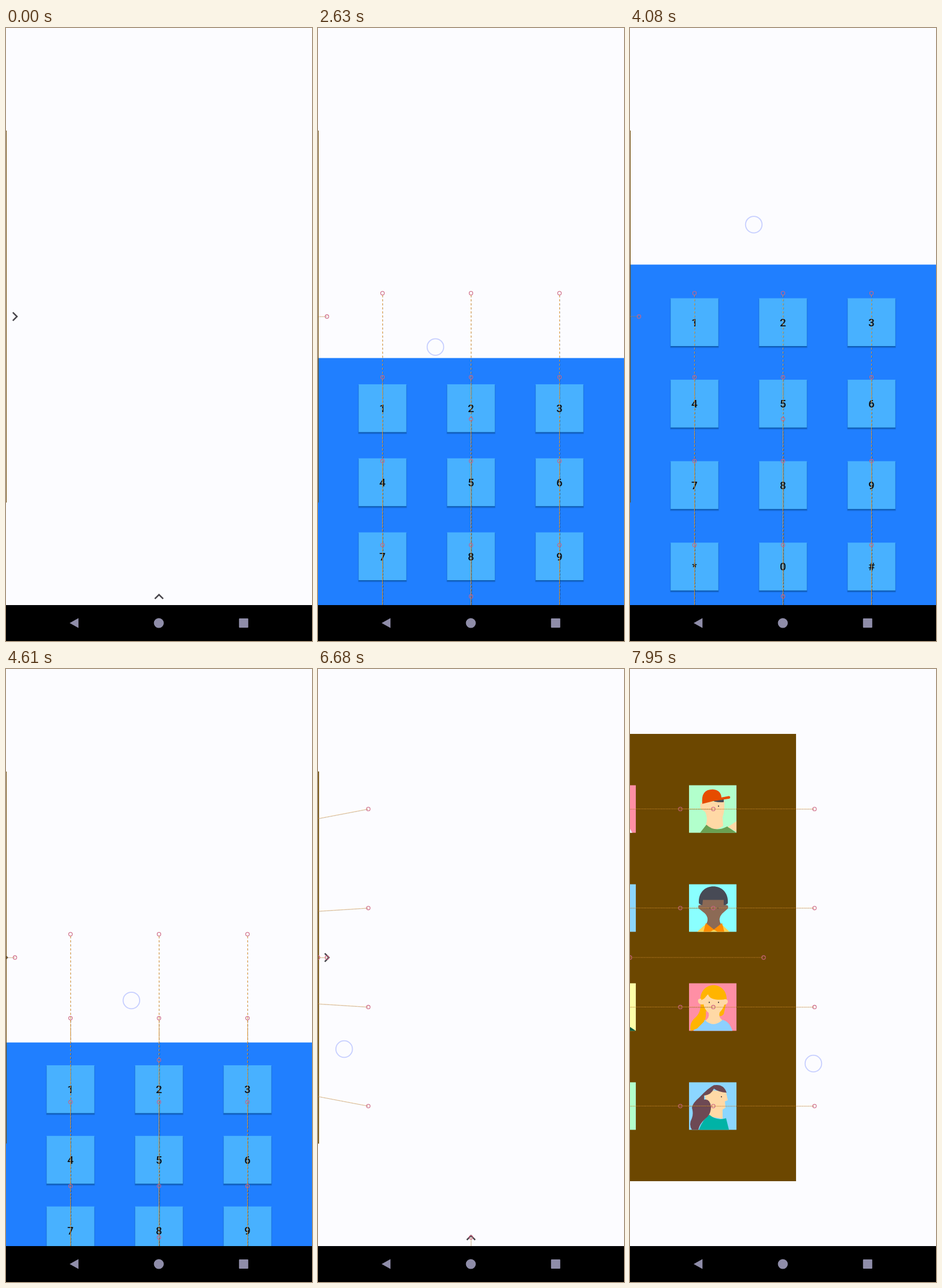
Write an HTML page that moves like this. It is 529 px wide and 1058 px high and loops after 7.99 s.

```html
<!DOCTYPE html>
<html lang="en">
<head>
<meta charset="utf-8">
<title>Sliding panels</title>
<style>
html, body { margin: 0; width: 100%; height: 100%; overflow: hidden; background: #fcfcff; }
svg { display: block; width: 100%; height: 100%; }
text { font: 500 19px Roboto, Arial, sans-serif; text-anchor: middle; fill: #101418; }
.chevron { fill: none; stroke: #47454b; stroke-width: 2.5; }
.trail { fill: none; stroke-dasharray: 1 1; }
.shade { stroke: #000; stroke-opacity: .4; transform: translate(.4px, .4px); }
.glow { stroke: #f0a238; stroke-opacity: .9; }
.knot { fill: none; stroke: #cc6480; stroke-width: 1.1; }
</style>
</head>
<body>
<svg viewBox="0 0 529 1058">
  <rect width="529" height="1058" fill="#fcfcff"/>
  <path id="chevRight" class="chevron" d="M11.8 490.8 19 498 11.8 505.2"/>
  <path id="chevUp" class="chevron" d="M257.3 985.2 264.5 978 271.7 985.2"/>
  <g id="keypad"><rect id="sheet" x="0" width="529" fill="#207fff"/></g>
  <g id="drawer"><rect id="board" x="-10" fill="#6c4700"/></g>
  <g id="keyTrails"></g>
  <g id="openTrails"></g>
  <g id="wideTrails"></g>
  <rect y="996" width="529" height="62"/>
  <g fill="#8f8da9">
    <path d="M110 1027 125.3 1018.5V1035.5Z"/>
    <circle cx="264.2" cy="1027" r="8.6"/>
    <rect x="402.8" y="1019" width="16" height="16" rx="1"/>
  </g>
  <circle id="touch" r="14.3" fill="none" stroke="#7f92ff" stroke-opacity=".42" stroke-width="1.8"/>
</svg>
<script>
const LOOP = 7990, TILE = 82.5, FLOOR = 996, MID = 498, DROP = 31;
const COLS = [111.5, 264.5, 417.5], ROWS = [0, 1, 2, 3];
const $ = id => document.getElementById(id);
const clamp = (v, lo, hi) => Math.min(hi, Math.max(lo, v));
const mix = (a, b, k) => a + (b - a) * k;

function add(parent, tag, attrs) {
  const el = document.createElementNS('http://www.w3.org/2000/svg', tag);
  set(el, attrs);
  parent.append(el);
  return el;
}
function set(el, attrs) {
  for (const k in attrs) el.setAttribute(k, attrs[k]);
}
const move = (el, x, y) => el.setAttribute('transform', `translate(${x} ${y})`);
const show = (el, on) => el.setAttribute('visibility', on ? 'visible' : 'hidden');

// Finger positions: [time, x, y]
const keyDrag = [
  [1520, 203, 967], [1690, 203, 894], [2630, 203, 551], [3120, 206, 357],
  [3490, 212, 273], [3860, 212, 272], [4080, 214, 339], [4650, 217, 590],
  [5240, 221, 869], [5450, 219, 980], [5780, 218, 1008]
];
const sideDrag = [
  [6680, 45, 656], [7170, 156, 667], [7460, 247, 674],
  [7710, 316, 681], [7910, 316, 681], [7950, 317, 681]
];

// Monotone cubic interpolation of one column of a drag
function follow(pts, t, c) {
  const last = pts.length - 1;
  if (t <= pts[0][0]) return pts[0][c];
  if (t >= pts[last][0]) return pts[last][c];
  const slope = i => (pts[i + 1][c] - pts[i][c]) / (pts[i + 1][0] - pts[i][0]);
  const tangent = i => {
    if (i === 0) return slope(0);
    if (i === last) return slope(last - 1);
    const a = slope(i - 1), b = slope(i);
    return a * b <= 0 ? 0 : 2 * a * b / (a + b);
  };
  let i = 0;
  while (t > pts[i + 1][0]) i++;
  const h = pts[i + 1][0] - pts[i][0], u = (t - pts[i][0]) / h;
  const u2 = u * u, u3 = u2 * u;
  return pts[i][c] * (2 * u3 - 3 * u2 + 1) + pts[i + 1][c] * (3 * u2 - 2 * u3)
    + h * (tangent(i) * (u3 - 2 * u2 + u) + tangent(i + 1) * (u3 - u2));
}

// Layout of the two panels for an open fraction
const sheetTop = p => mix(FLOOR, 354, p);
const keyGap = p => mix(11.5, 62.4, p);
const keyY = (row, p) => sheetTop(p) + keyGap(p) + TILE / 2 + row * (TILE + keyGap(p));
const sheetMid = p => sheetTop(p) + (4 * TILE + 5 * keyGap(p)) / 2;
const boardH = p => mix(642, 772, p);
const faceY = (row, p) => MID + (row - 1.5) * (TILE + (boardH(p) - 4 * TILE) / 5);

// Dashed path with a ring at each end
function trail(parent, x1, y1, x2, y2) {
  for (const c of ['shade', 'glow'])
    add(parent, 'path', { class: 'trail ' + c, d: `M${x1} ${y1}L${x2} ${y2}`, pathLength: 170 });
  for (const [cx, cy] of [[x1, y1], [x2, y2]])
    add(parent, 'circle', { class: 'knot', cx, cy, r: 3.1 });
}
const upTrail = g => trail(g, 264.5, 981, 264.5, 981 + DROP);
const rightTrail = g => trail(g, 15.5, MID, 15.5 - DROP, MID);

for (const x of COLS)
  for (const r of ROWS) trail($('keyTrails'), x, keyY(r, 0), x, keyY(r, 1));
trail($('keyTrails'), 264.5, sheetMid(0), 264.5, sheetMid(1));
upTrail($('keyTrails'));
rightTrail($('keyTrails'));

for (const r of ROWS) {
  trail($('openTrails'), -117.5, faceY(r, 0), 87, faceY(r, 1));
  trail($('wideTrails'), 87, faceY(r, 1), 319, faceY(r, 1));
  trail($('wideTrails'), -88, faceY(r, 1), 144, faceY(r, 1));
}
trail($('openTrails'), -231, MID, 0, MID);
upTrail($('openTrails'));
rightTrail($('openTrails'));
trail($('wideTrails'), 0, MID, 231, MID);

// Keys, drawn around their centres
const keys = [...'123456789*0#'].map(label => {
  const g = add($('keypad'), 'g', {}), half = TILE / 2;
  add(g, 'rect', { x: -half - 1, y: -half + 1, width: TILE + 2, height: TILE + 2.5, rx: 1, fill: '#003c82', 'fill-opacity': .22 });
  add(g, 'rect', { x: -half, y: -half + 1, width: TILE, height: TILE + 1, fill: '#00467e', 'fill-opacity': .45 });
  add(g, 'rect', { x: -half, y: -half, width: TILE, height: TILE, fill: '#48b1ff' });
  add(g, 'text', { y: 6.8 }).textContent = label;
  return g;
});

// Portraits in an 82 pixel square: background, then [colour, path]
const SKIN = '#ffd9a6', DARK = '#474a55', EYE = '#463c40';
const dot = (x, y) => `M${x - 1.1} ${y}a1.1 1.1 0 1 0 2.2 0a1.1 1.1 0 1 0-2.2 0`;
const mainFaces = [
  ['#b2ffcc',
    [SKIN, 'M23 29Q17 33 21 41L28 46Q33 57 29 69Q44 82 59 70L58 55Q62 44 61 27Z'],
    ['#6aa052', 'M19 82 30 68Q45 82 66 71L82 82Z'],
    [SKIN, 'M67 72 82 62V80Z'],
    [DARK, 'M41 26 60 24V29Q53 30 44 28Z'],
    ['#e64c00', 'M23 32Q20 7 41 7Q55 8 56 21L69 18.5Q73 20 70 23L43 27Z'],
    [EYE, dot(51, 36)]],
  ['#8affff',
    [DARK, 'M17 33C14-6 70-6 67 33L60 38H24Z'],
    ['#ffd24d', 'M14 82 30 68H55L70 82Z'],
    ['#8c6a55', 'M24 27H60V36Q70 34 67 42L57 51Q49 60 56 70L43 79 29 70Q36 59 27 50L17 42Q13 34 23 36Z'],
    ['#ff8c00', 'M25 82 29 67 43 78 57 67 61 82H49L43 78 37 82Z'],
    [EYE, dot(36, 41) + dot(50, 41)]],
  ['#ff8fa5',
    ['#ffb400', 'M20 32C16-6 68-6 65 31L60 53Q52 62 48 50L29 48Q31 66 18 78L3 82Q0 68 11 59Q21 51 20 32Z'],
    [SKIN, 'M22 27Q14 25 16 33Q19 38 25 36Q27 46 34 51Q36 60 27 65Q43 78 58 64Q50 58 53 50Q59 44 61 37Q68 36 67 30Q65 26 60 28Q36 30 33 19Z'],
    ['#8cd0ff', 'M8 82Q14 65 27 63Q42 78 58 63Q70 66 75 82Z'],
    ['#ffb400', 'M21 29Q28 27 33 17Q38 30 63 27L58 13 40 6 24 14Z M22 45Q29 58 26 66L14 78 3 82Q1 68 12 59Z'],
    [EYE, dot(35, 33) + dot(51, 33)]],
  ['#8cd6ff',
    [SKIN, 'M27 20 42 14 64 17 67 31 62 33 63 44 58 47 58 63 34 59 29 33Z'],
    ['#00b3a6', 'M17 82Q24 64 35 56Q48 67 64 62L69 82Z'],
    ['#6d4954', 'M65 18Q51 17 43 11Q38 22 26 23V30Q36 28 38 42Q38 56 28 63Q18 72 16 82H5Q-1 73 5 62Q8 54 5 44Q6 36 18 26Q33 10 43 5Q60 2 65 18Z'],
    [EYE, dot(56, 25)]]
];
const edgeFaces = [
  ['#ff8fa5', ['#f0f0f6', 'M62 58 76 82H20Z']],
  ['#8cd6ff'],
  ['#ffffa8', ['#0a5a3c', 'M58 66 82 82H10Z']],
  ['#b2ffcc']
];
function portrait([back, ...parts]) {
  const g = add($('drawer'), 'g', {});
  const art = add(g, 'g', { transform: 'translate(-41 -41)' });
  add(art, 'rect', { width: 82, height: 82, fill: back });
  for (const [fill, d] of parts) add(art, 'path', { fill, d });
  return g;
}
const near = mainFaces.map(portrait), far = edgeFaces.map(portrait);

function update(t) {
  const onSide = t >= 6680;
  const drag = onSide ? sideDrag : keyDrag;
  const x = follow(drag, t, 1), y = follow(drag, t, 2);

  let top = FLOOR;
  if (t >= 1520 && !onSide)
    top = t < 3675 ? 570 + (y - 551) * 1.026 : 408 + (y - 339) * 1.015;
  top = clamp(top, 354, FLOOR);
  const p = (FLOOR - top) / (FLOOR - 354);

  const right = onSide ? Math.max(1, 118 + (x - 156) * 1.05) : 1;
  const s = clamp((right - 1) / 230, 0, 1);
  const wide = Math.max(0, right - 231);

  set($('sheet'), { y: top, height: FLOOR - top });
  keys.forEach((key, i) => move(key, COLS[i % 3], keyY(Math.floor(i / 3), p)));

  set($('board'), { y: MID - boardH(s) / 2, width: right + 10, height: boardH(s) });
  const faceX = mix(-117.5, 87, s) + wide;
  for (const r of ROWS) {
    move(near[r], faceX, faceY(r, s));
    move(far[r], faceX - 174, faceY(r, s));
  }

  const away = DROP * Math.max(p, s);
  move($('chevRight'), -away, 0);
  move($('chevUp'), 0, away);

  show($('keyTrails'), t >= 1520 && !onSide);
  show($('openTrails'), onSide && wide === 0);
  show($('wideTrails'), wide > 0);
  show($('touch'), onSide || (t >= 1520 && t < 5820));
  set($('touch'), { cx: x, cy: y });
}

const start = performance.now();
function tick() {
  update((performance.now() - start) % LOOP);
  requestAnimationFrame(tick);
}
tick();
</script>
</body>
</html>
```
